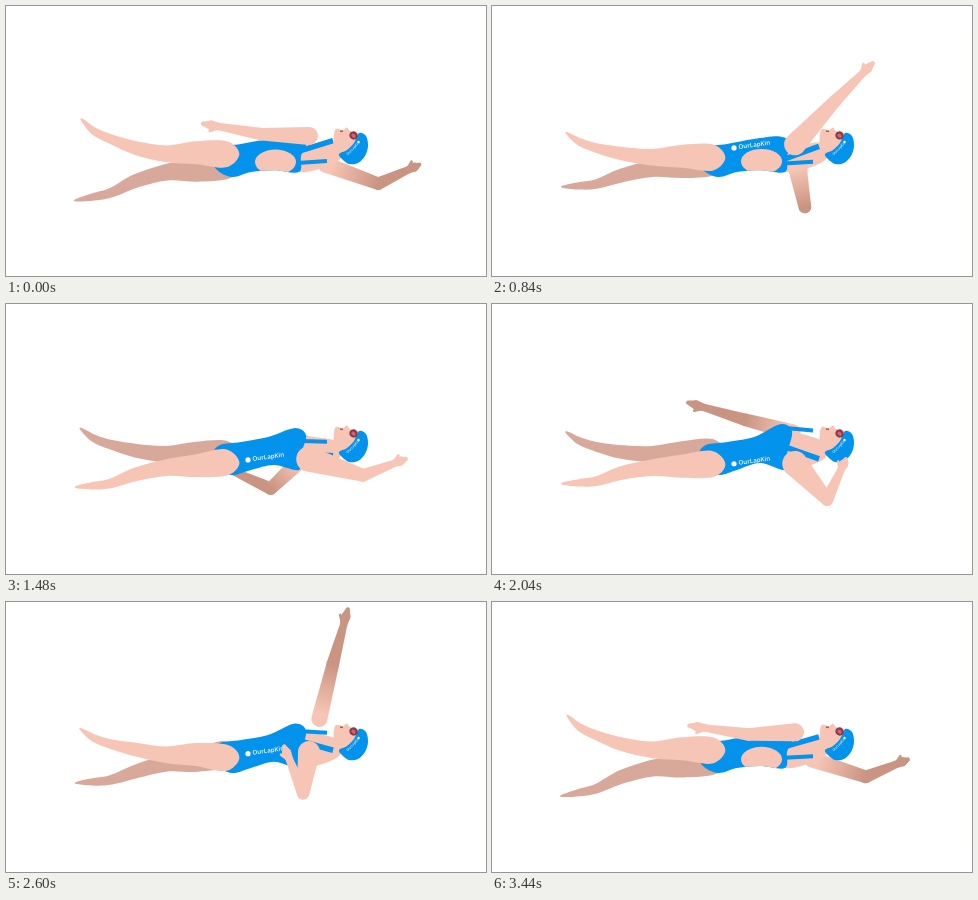
These frames come from a looping animation (480x270 px, 3.48 s). An HTML page with a canvas:

```html
<!DOCTYPE html>
<html lang="en">
<head>
<meta charset="utf-8">
<title>Backstroke</title>
<style>
  html, body { margin: 0; width: 100%; height: 100%; overflow: hidden; background: #fff; }
  canvas { display: block; width: 480px; height: 270px; }
</style>
</head>
<body>
<canvas id="stage" width="480" height="270"></canvas>
<script>
const ctx = document.getElementById('stage').getContext('2d');
const LOOP = 3480, TURN = 2 * Math.PI;
const SKIN = '#f7c5b5', SHADE = '#d8a99b', DARK = '#ca9482', BLUE = '#0392ec';
const BRAND = 'OurLapKin';
const { cos, sin, tanh } = Math;
const rad = degrees => degrees * Math.PI / 180;

// Cyclic motion: a mean plus the first two harmonics
const wave = (p, mean, c1, s1, c2 = 0, s2 = 0) =>
  mean + c1 * cos(p) + s1 * sin(p) + c2 * cos(2 * p) + s2 * sin(2 * p);

// Closed smooth outline
function blob(points, color) {
  const n = points.length, at = i => points[(i + n) % n];
  ctx.beginPath();
  ctx.moveTo(...at(0));
  for (let i = 0; i < n; i++) {
    const [a, b, c, d] = [at(i - 1), at(i), at(i + 1), at(i + 2)];
    ctx.bezierCurveTo(b[0] + (c[0] - a[0]) / 6, b[1] + (c[1] - a[1]) / 6,
      c[0] - (d[0] - b[0]) / 6, c[1] - (d[1] - b[1]) / 6, c[0], c[1]);
  }
  ctx.fillStyle = color;
  ctx.fill();
}

// Smooth band around a spine of [x, y, half width], rounded at its first point
function ribbon(spine, color) {
  const sides = [[], []];
  spine.forEach(([x, y, r], i) => {
    const a = spine[Math.max(i - 1, 0)], b = spine[Math.min(i + 1, spine.length - 1)];
    const angle = Math.atan2(b[1] - a[1], b[0] - a[0]);
    sides[0].push([x - r * sin(angle), y + r * cos(angle)]);
    sides[1].unshift([x + r * sin(angle), y - r * cos(angle)]);
  });
  const [x, y, r] = spine[0];
  blob([...sides[0], ...sides[1], [x + r * .95, y]], color);
}

function oval(x, y, rx, ry, color, angle = 0) {
  ctx.beginPath();
  ctx.ellipse(x, y, rx, ry, rad(angle), 0, TURN);
  ctx.fillStyle = color;
  ctx.fill();
}

function line(x1, y1, x2, y2, width, color) {
  ctx.beginPath();
  ctx.moveTo(x1, y1);
  ctx.lineTo(x2, y2);
  ctx.lineWidth = width;
  ctx.strokeStyle = color;
  ctx.stroke();
}

function taper(p, q, r1, r2) {
  const a = Math.atan2(q[1] - p[1], q[0] - p[0]), h = TURN / 4;
  ctx.beginPath();
  ctx.arc(...p, r1, a + h, a + 3 * h);
  ctx.arc(...q, r2, a - h, a + h);
  ctx.fill();
}

// One stroke rule for both arms, p being the arm's own phase
function arm(p, shoulder, radius, far) {
  const go = (from, angle, d) => [from[0] + d * cos(angle), from[1] + d * sin(angle)];
  const upperAngle = p + rad(wave(p, 202, -14, 19, -6, -5));
  const foreAngle = rad(wave(p, 269, -65, 36, -14, -5));
  const fore = 54 + 8 * cos(p - .2);
  const elbow = go(shoulder, upperAngle, 50 + 9 * cos(p - 1.9));
  const wrist = go(elbow, foreAngle, fore * .7), palm = go(elbow, foreAngle, fore * .84);
  ctx.fillStyle = SKIN;
  if (far) {
    const shade = ctx.createLinearGradient(...shoulder, ...elbow);
    shade.addColorStop(.1, SKIN);
    shade.addColorStop(1, DARK);
    ctx.fillStyle = shade;
  }
  taper(shoulder, elbow, radius, 6.3);
  taper(elbow, wrist, 6.3, 3.7);
  taper(wrist, palm, 3.7, 4.6);
  taper(palm, go(elbow, foreAngle, fore - 2), 4.6, 2.2);
  taper(wrist, go(palm, foreAngle - TURN / 4, 6), 2.5, 1.3);
}

// side is 1 for the near leg, -1 for the far one; the kick grows towards the foot
function leg(p, roll, side, color) {
  const kick = side * tanh(3 * cos(4 * p - .2)) * (1 + .5 * cos(p) ** 8);
  const r = roll * side;
  ribbon([
    [221, 154 - 6 * r, 13],
    [190, 155.5 - 4 * kick - 3 * r, 11.5],
    [160, 157 - 5 * kick - 2 * r, 8.3],
    [130, 158.5 - 11 * kick, 6.8],
    [105, 160 - 18 * kick, 4.8],
    [88, 158 - 22 * kick, 3.8],
    [73 + 2 * kick, 154 - 27 * kick, 1.2]
  ], color);
}

function label(x, y, angle, size, alpha) {
  ctx.save();
  ctx.globalAlpha = alpha;
  ctx.translate(x, y);
  ctx.rotate(rad(angle));
  ctx.font = `600 ${size}px "Open Sans", sans-serif`;
  ctx.textBaseline = 'middle';
  ctx.fillStyle = '#fff';
  ctx.fillText(BRAND, 0, 0);
  ctx.restore();
}

function torso(p, roll) {
  const turn = cos(p - TURN / 8), bust = 126 + 6 * turn;
  blob([[284, bust + 3], [304, bust + 8], [330, 137], [336, 150], [322, 160], [293, 166], [286, 150]], SKIN);
  line(290, 146 + 8 * sin(p), 327, 144.5 - 10.5 * roll, 5.5, BLUE);
  line(288, 143 + 20 * turn, 321, 143 + 17 * turn, 4, BLUE);
  blob([[207, 150], [214, 141], [235, 138], [262, 133], [288, bust], [300, bust + 7], [295, 150],
    [293, 166], [268, 162 + 3 * turn], [245, 166], [226, 171], [210, 163]], BLUE);
  ctx.save();
  ctx.clip();
  oval(269.5, 171 - 21 * turn, 20.5, 12.5, SKIN);
  ctx.restore();

  const y = 145 - 13 * roll, alpha = Math.max(0, Math.min(1, (y - 135) / 4));
  ctx.globalAlpha = alpha;
  oval(242, y + 2, 2.6, 2.6, '#fff');
  ctx.globalAlpha = 1;
  label(246.5, y + 1.5, -8, 6.2, alpha);
}

function head() {
  blob([[329, 124], [337, 124], [341, 121.5], [344, 125], [351, 126], [352, 134], [341, 148], [334, 150], [328, 142]], SKIN);
  blob([[353, 127], [360, 130], [362, 140], [359, 150], [352, 157], [343, 158], [336, 153], [333, 148], [341, 144], [348, 137]], BLUE);
  line(334, 125, 337, 125.5, 1.4, '#b4575a');
  oval(347.5, 129.5, 4.3, 4, '#87394a', 40);
  oval(347.5, 129.7, 2.4, 1.8, '#d9606c', 40);
  label(341, 149, -46, 3.4, .85);
  oval(352.5, 136, 1.2, 1.2, '#fff');
}

function draw(now) {
  const p = now % LOOP / LOOP * TURN, roll = cos(p - .35);
  ctx.fillStyle = '#fff';
  ctx.fillRect(0, 0, 480, 270);
  const farShoulder = [308 + 13 * cos(p + .44), wave(p, 145, 6.6, 20.8, 7, -4)];
  arm(p + 1540 / LOOP * TURN, farShoulder, 8, true);
  leg(p, roll, -1, SHADE);
  torso(p, roll);
  leg(p, roll, 1, SKIN);
  head();
  arm(p, [303, 144.5 - 15.5 * roll], 11 - 2 * cos(p), false);
  requestAnimationFrame(draw);
}
requestAnimationFrame(draw);
</script>
</body>
</html>
```
